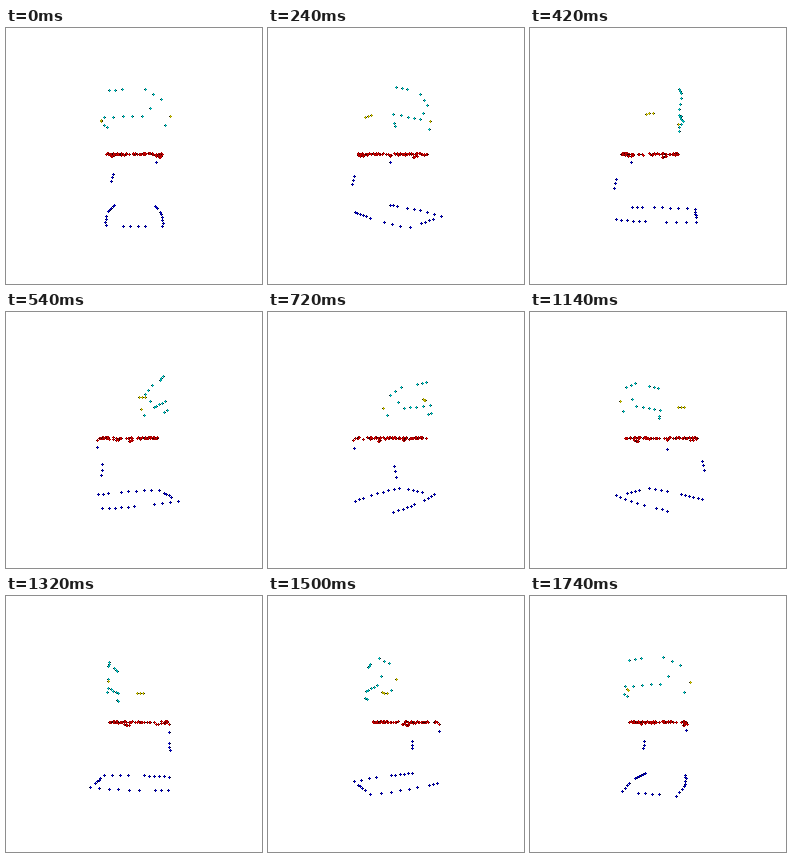
An HTML page with a canvas that plays this animation: 256x256 px, repeating every 1.8 s.

```html
<!DOCTYPE html>
<html lang="en">
<head>
<meta charset="utf-8">
<title>Turning chair point cloud</title>
<style>
html, body { margin: 0; width: 100%; height: 100%; overflow: hidden; background: #fff; }
canvas { display: block; width: 256px; height: 256px; }
</style>
</head>
<body>
<canvas id="c" width="256" height="256"></canvas>
<script>
const ctx = document.getElementById('c').getContext('2d');
const STEP = 60, STEPS = 30, DIST = 215, MID = 128, FLOOR = 57.6;
const CYAN = [0, 200, 200], YELLOW = [215, 205, 0], BLUE = [0, 0, 205], RED = [225, 0, 0];
const points = [];

let seed = 29;
const rnd = () => (seed = (seed * 16807) % 2147483647) / 2147483647;
const mix = (a, b, t) => a + (b - a) * t;
const add = (color, x, y, z) => points.push({ color, x, y, z });

// n evenly spaced points from a to b
function line(color, n, a, b) {
  for (let i = 0; i < n; i++) {
    const t = n > 1 ? i / (n - 1) : 0;
    add(color, ...a.map((v, k) => mix(v, b[k], t)));
  }
}

// n random points close to the line from a to b
function scatter(color, n, a, b, wobble) {
  for (let i = 0; i < n; i++) {
    const t = rnd();
    add(color, ...a.map((v, k) => mix(v, b[k], t) + (rnd() - 0.5) * wobble));
  }
}

// floor runner, bowed outwards; side is 1 or -1
function runner(side, n, z0, z1) {
  for (let i = 0; i < n; i++) {
    const z = mix(z0, z1, i / (n - 1));
    add(BLUE, side * (26.8 - 0.0025 * z * z), FLOOR, z);
  }
}

// backrest: top edge, right side, lower edge, lower left corner
line(CYAN, 3, [-23, -59.2, -21], [-11, -59.4, -23]);
line(CYAN, 3, [9.5, -59.5, -23], [24.3, -51.8, -21]);
line(CYAN, 2, [14, -42.4, -23.3], [27.9, -28.3, -20.8]);
line(CYAN, 5, [-27, -35.2, -21.4], [7, -35.4, -24.5]);
line(CYAN, 2, [-27, -27.5, -22.5], [-24.8, -25.8, -21]);

// armrests
line(YELLOW, 3, [-34, -35.7, 7], [-33, -36.3, 0.5]);
add(YELLOW, 32.7, -36.8, -19);

// frame: uprights, then the base
add(BLUE, 25.4, 7.3, 33.2);
line(BLUE, 3, [-24.3, 20.5, 36], [-26.5, 29, 37]);
runner(1, 3, 32, 21);
runner(1, 6, 7, -38);
runner(-1, 6, 36, 9);
runner(-1, 4, -10, -36);
line(BLUE, 4, [-9, FLOOR, -37], [9, FLOOR, -37]);

// seat: four edges, then the parts that dip lower
scatter(RED, 30, [-23, -2.1, 31], [26, -2.1, 31], 1.4);
scatter(RED, 30, [-26, -2.1, -15], [26, -2.1, -20], 1.4);
scatter(RED, 12, [26, -2.1, -20], [26, -2.1, 31], 1.4);
scatter(RED, 12, [-26, -2.1, -15], [-26, -2.1, 31], 1.4);
line(RED, 4, [24.8, 0.8, -2], [26.4, 0.4, -6]);
line(RED, 3, [-24, 0.3, 22], [-27, -0.8, 27]);
add(RED, 26, -0.2, 33.5);

function project(p, cos, sin) {
  const z = p.z * cos + p.x * sin;
  const s = DIST / (DIST + z);
  return { color: p.color, z, x: MID + (p.x * cos - p.z * sin) * s, y: MID + p.y * s };
}

// a small cross of pixels with a shaded rim and one dark speck
function dot({ color, x, y }) {
  const px = Math.round(x), py = Math.round(y);
  const shade = k => ctx.fillStyle = `rgb(${color.map(v => Math.round(v * k))})`;
  shade(0.75);
  ctx.fillRect(px - 1, py, 3, 1);
  ctx.fillRect(px, py - 1, 1, 3);
  shade(1);
  ctx.fillRect(px, py, 1, 1);
  shade(0.2);
  ctx.fillRect(x > px ? px + 1 : px - 1, py, 1, 1);
}

function draw(now) {
  const angle = Math.floor(now / STEP) % STEPS * 2 * Math.PI / STEPS;
  const cos = Math.cos(angle), sin = Math.sin(angle);
  ctx.fillStyle = '#fff';
  ctx.fillRect(0, 0, 256, 256);
  points.map(p => project(p, cos, sin)).sort((a, b) => b.z - a.z).forEach(dot);
}

let start;
function tick(now) {
  if (start === undefined) start = now;
  draw(now - start);
  requestAnimationFrame(tick);
}
draw(0);
requestAnimationFrame(tick);
</script>
</body>
</html>
```
